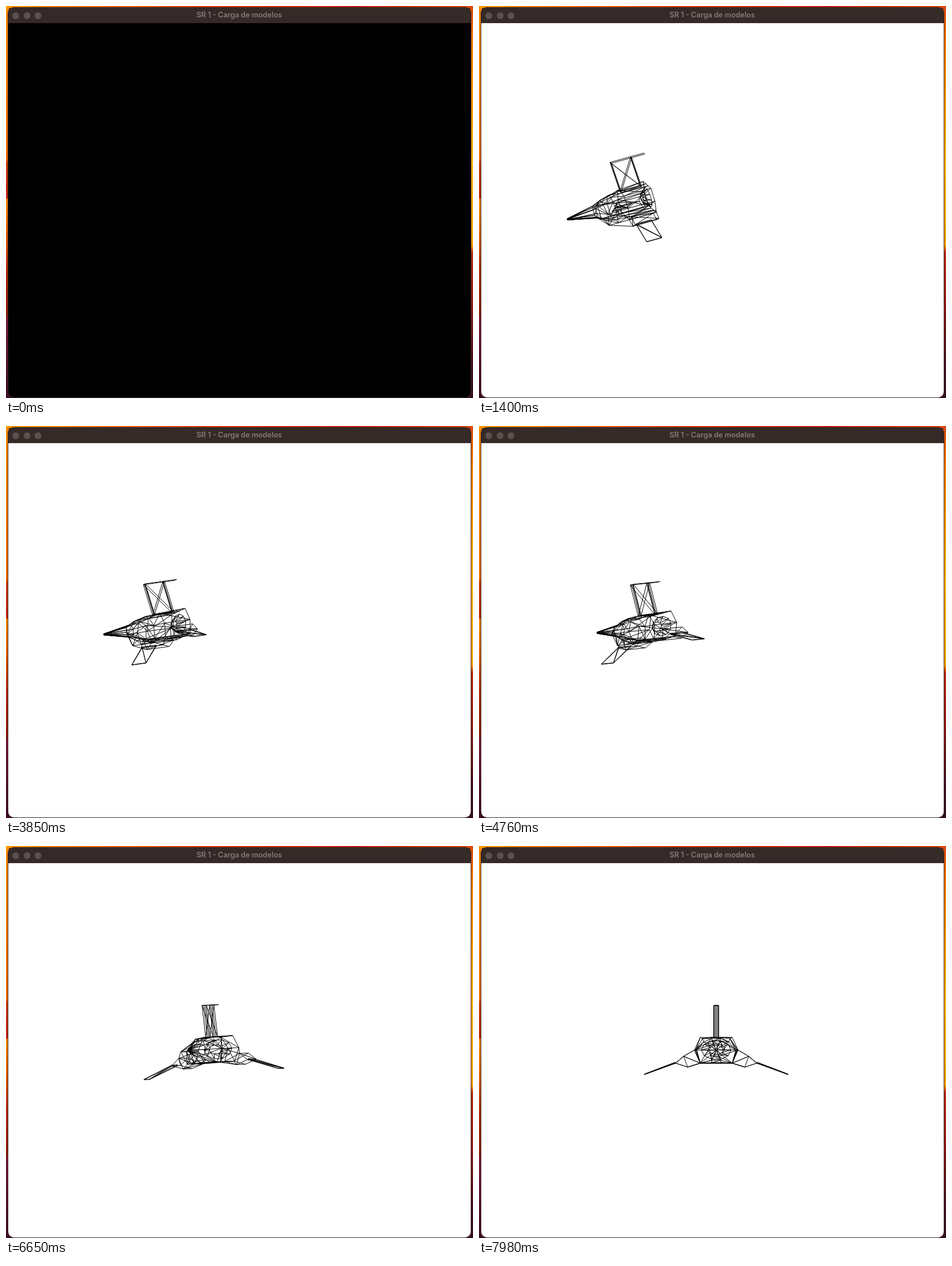
An HTML page with a canvas that plays this animation: 817 px wide and 686 px high, repeating every 8000 ms.

```html
<!DOCTYPE html>
<html lang="es">
<head>
<meta charset="utf-8">
<title>SR 1 - Carga de modelos</title>
<style>
  html, body { margin: 0; width: 100%; height: 100%; overflow: hidden; }
  body {
    position: relative;
    background:
      linear-gradient(90deg, #ff9800, #f06a08 20%, #d83a10 45%, #c02010 75%, #d84a10) 0 0 / 817px 4px no-repeat,
      linear-gradient(#f98a08, #ee6a05 39%, #c83c08 40%, #c02408 49%, #f58a08 49.3%, #e06008 58%, #b02808 68%, #8c1c08 79%, #7a1a3c 80%, #3a0a24) 0 0 / 5px 686px no-repeat,
      linear-gradient(#d84a10, #f47a08 10%, #ffae10 40%, #f8a010 61%, #b82a10 63%, #8a1a18 78%, #401020 92%, #301020) 812px 0 / 5px 686px no-repeat,
      #381020;
  }
  #window {
    position: absolute; left: 4px; top: 3px; width: 809px; height: 682px;
    border-radius: 10px; overflow: hidden; background: #352a27;
    box-shadow: 0 0 0 1px #3c2420;
  }
  #title {
    position: absolute; left: 0; top: 0; width: 808px; height: 26px;
    font: 600 12.8px/26px Inter, sans-serif; color: #857a77; text-align: center;
  }
  .dot {
    position: absolute; top: 7.5px; width: 12px; height: 12px;
    border-radius: 50%; background: #5a504d;
  }
  canvas { position: absolute; left: 0; top: 27px; }
</style>
</head>
<body>
<div id="window">
  <div id="title">SR 1 - Carga de modelos</div>
  <i class="dot" style="left:7px"></i>
  <i class="dot" style="left:26.5px"></i>
  <i class="dot" style="left:46px"></i>
  <canvas width="809" height="655"></canvas>
</div>
<script>
const ctx = document.querySelector('canvas').getContext('2d');
const LOOP = 8000, STEP = 70;
const RATE = 0.0158 * Math.PI / 180;   // radians per ms
const TILT = 0.218;                    // lean of the spin axis
const sinTilt = Math.sin(TILT), cosTilt = Math.cos(TILT);

// Model space: x right, y up, z towards the nose; origin at the fin's base.
const edges = [];
const line = (...points) => {
  for (let i = 1; i < points.length; i++) edges.push([points[i - 1], points[i]]);
};
const loop = points => line(...points, points[0]);

function skin(rings) {
  rings.forEach((ring, r) => {
    loop(ring);
    const next = rings[r + 1];
    if (!next) return;
    ring.forEach((p, i) => {
      line(p, next[i]);
      line(p, next[(i + (r % 2 ? 1 : ring.length - 1)) % ring.length]);
    });
  });
}

// Each hull section: z, then the right half of its outline from top to bottom.
const sections = [
  [-30, [8, 0], [28, 0], [38, -22], [28, -45], [8, -45]],
  [19, [8, 0], [24, -2], [36, -22], [28, -45], [8, -45]],
  [40, [8, -2], [22, -8], [34, -23], [28, -45], [8, -44]],
  [57, [6, -6], [16, -10], [38, -22], [28, -45], [8, -40]],
  [71, [4, -12], [11, -14], [14, -22], [10, -31], [4, -33]],
  [122, [1, -21], [1, -21], [1, -22], [1, -23], [1, -23]]
];
skin(sections.map(([z, ...half]) => [
  ...half.map(([x, y]) => [x, y, z]),
  ...half.map(([x, y]) => [-x, y, z]).reverse()
]));

// Engine inside the hull
const ellipse = (rx, ry, z) => Array.from({ length: 10 }, (_, i) => {
  const a = i * Math.PI / 5;
  return [rx * Math.cos(a), -22 + ry * Math.sin(a), z];
});
skin([ellipse(26, 17, -27), ellipse(12, 8, -16)]);

// Fin
for (const x of [-4, 4]) {
  const a = [x, 0, 19], b = [x, 56, 25], c = [x, 56, -13], d = [x, 0, -19];
  loop([a, b, c, d]);
  line(a, c);
  line(b, d);
  line(c, [x, 56, -37]);
  line([x / 3, 0, 18], [x / 3, 56, 24]);
  line([x / 3, 0, -18], [x / 3, 56, -12]);
}
for (const z of [25, -13, -37]) line([-4, 56, z], [4, 56, z]);

// Pods and wings
for (const side of [-1, 1]) {
  const pod = z => [[28, -45], [57, -33], [71, -45], [50, -52]].map(([x, y]) => [side * x, y, z]);
  const front = pod(20), back = pod(-24);
  loop(front);
  loop(back);
  front.forEach((p, i) => line(p, back[i]));
  line(front[1], back[2]);
  line(front[3], back[0]);
  line(front[1], front[3]);
  line([side * 38, -22, 57], front[1], [side * 38, -22, -30]);
  line([side * 28, -45, 57], front[3]);

  for (const lift of [0, 1.6]) {
    const root = z => [side * 71, -45 + lift, z], tip = z => [side * 126, -65 + lift / 3, z];
    loop([root(18), tip(17), tip(-11), root(-10)]);
    line(root(18), tip(-11));
  }
}

function draw(time) {
  const t = Math.floor(time / STEP) * STEP;
  ctx.fillStyle = t ? '#fff' : '#000';
  ctx.fillRect(0, 0, 809, 655);
  if (!t) return;

  const angle = (7980 - t) * RATE;
  const sin = Math.sin(angle), cos = Math.cos(angle);
  const originX = 411 - 154 * sin;
  const originY = 305 - 11.5 * (1 - cos);
  const project = ([x, y, z]) => {
    const y1 = cosTilt * y - sinTilt * z;
    const z1 = sinTilt * y + cosTilt * z;
    const depth = x * sin + z1 * cos;
    return [originX + x * cos - z1 * sin, originY - cosTilt * y1 - sinTilt * depth];
  };
  ctx.strokeStyle = '#000';
  ctx.lineWidth = 1;
  ctx.beginPath();
  for (const [from, to] of edges) {
    ctx.moveTo(...project(from));
    ctx.lineTo(...project(to));
  }
  ctx.stroke();
}

const start = performance.now();
function tick() {
  draw((performance.now() - start) % LOOP);
  requestAnimationFrame(tick);
}
tick();
</script>
</body>
</html>
```
